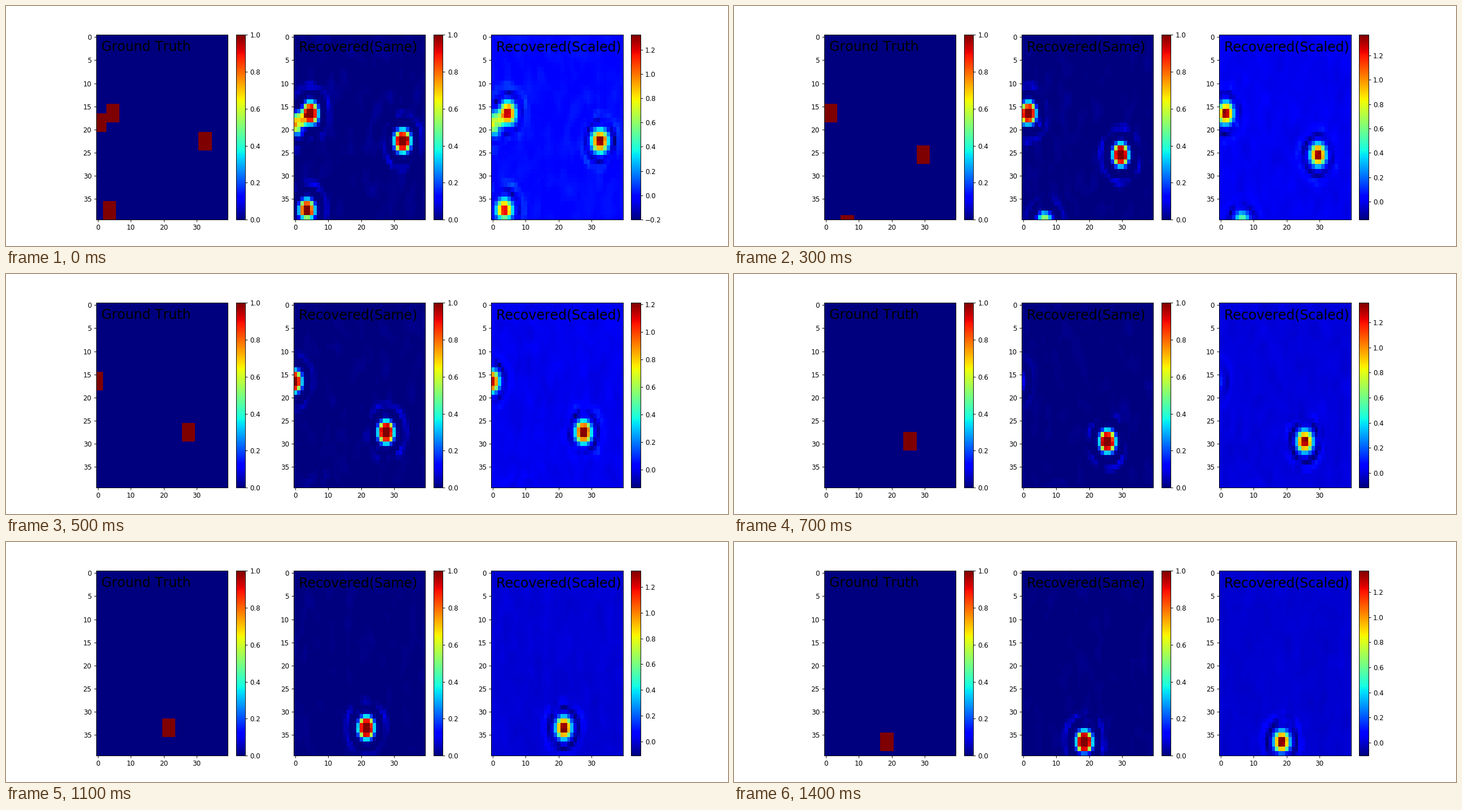
Recreate the animation shown at these times as a matplotlib script. Size 1280 by 427 pixels, loop 1500 ms.

```python
import numpy as np
import matplotlib.pyplot as plt
from matplotlib.animation import FuncAnimation

plt.rcParams["text.kerning_factor"] = 6  # whole-pixel kerning

N = 40           # grid cells per side
SIDE = 4         # target size in cells
FRAMES = 15
DPI = 1280 / 15

# column, row, column step, row step, strength
TARGETS = [
    (31, 21, -1, 1, 1.0),
    (3, 15, -1, 0, 0.95),
    (-1, 17, -1, 0, 0.6),
    (2, 36, 1, 1, 0.9),
]

rows, cols = np.mgrid[:N, :N]


def positions(i):
    for col, row, dc, dr, strength in TARGETS:
        yield col + dc * i, row + dr * i, strength


def truth(i):
    field = np.zeros((N, N))
    for c, r, _ in positions(i):
        field[max(r, 0):max(r + SIDE, 0), max(c, 0):max(c + SIDE, 0)] = 1
    return field


def smooth_noise(rng):
    n = rng.standard_normal((N, N))
    for axis in (0, 0, 0, 1):
        n = (np.roll(n, 1, axis) + 2 * n + np.roll(n, -1, axis)) / 4
    return n / n.std()


def bump(dist, center, width):
    return np.exp(-((dist - center) / width) ** 2)


def response(dist):
    """Bright core, dark halo and a faint outer ring."""
    core = 1.32 * np.exp(-(dist / 2.25) ** 2.6)
    return core - 0.09 * bump(dist, 4.2, 0.7) + 0.045 * bump(dist, 6, 0.8)


def value_range(i):
    low = -0.101 - 0.1 * np.exp(-i / 4)
    high = 1.29 + 0.08 * np.cos(2 * np.pi * (i - 3) / 3.667)
    return low, high


def recovered(i):
    rng = np.random.default_rng(100 + i)
    field = (0.005 + 0.004 * np.exp(-i / 4)) * smooth_noise(rng)
    ripple = smooth_noise(rng)
    grain = rng.standard_normal((N, N))
    mid = (SIDE - 1) / 2
    for c, r, strength in positions(i):
        dist = np.hypot(cols - c - mid, rows - r - mid)
        seen = -SIDE < c < N and -SIDE < r < N
        gain = strength if seen else 0.35 * strength
        vary = np.where(dist > 3.7, 0.7 * ripple, 0.025 * grain)
        field += gain * response(dist) * (1 + vary)
    field[-1] *= 0.65  # weaker along the bottom edge

    # move only the extremes onto the range
    low, high = value_range(i)
    peak, dip = field.max(), field.min()
    up, down = field.clip(0) / peak, field.clip(None, 0) / dip
    return field + (high - peak) * up ** 6 + (low - dip) * down ** 4


fig, axes = plt.subplots(1, 3, figsize=(15, 427 * 15 / 1280), dpi=DPI)
fig.subplots_adjust(left=0.125, right=0.8999)
images = []
for ax, title in zip(axes, ["Ground Truth", "Recovered(Same)", "Recovered(Scaled)"]):
    im = ax.imshow(np.zeros((N, N)), cmap="jet", vmin=0, vmax=1,
                   aspect="auto", interpolation="nearest")
    ax.text(1, 3, title, fontsize=20)
    fig.colorbar(im, ax=ax)
    images.append(im)


def update(i):
    field = recovered(i)
    images[0].set_data(truth(i))
    images[1].set_data(field)
    images[2].set_data(field)
    images[2].set_clim(*value_range(i))
    return images


anim = FuncAnimation(fig, update, frames=FRAMES, interval=100,
                     repeat=True, repeat_delay=0, blit=False)
plt.show()
```
